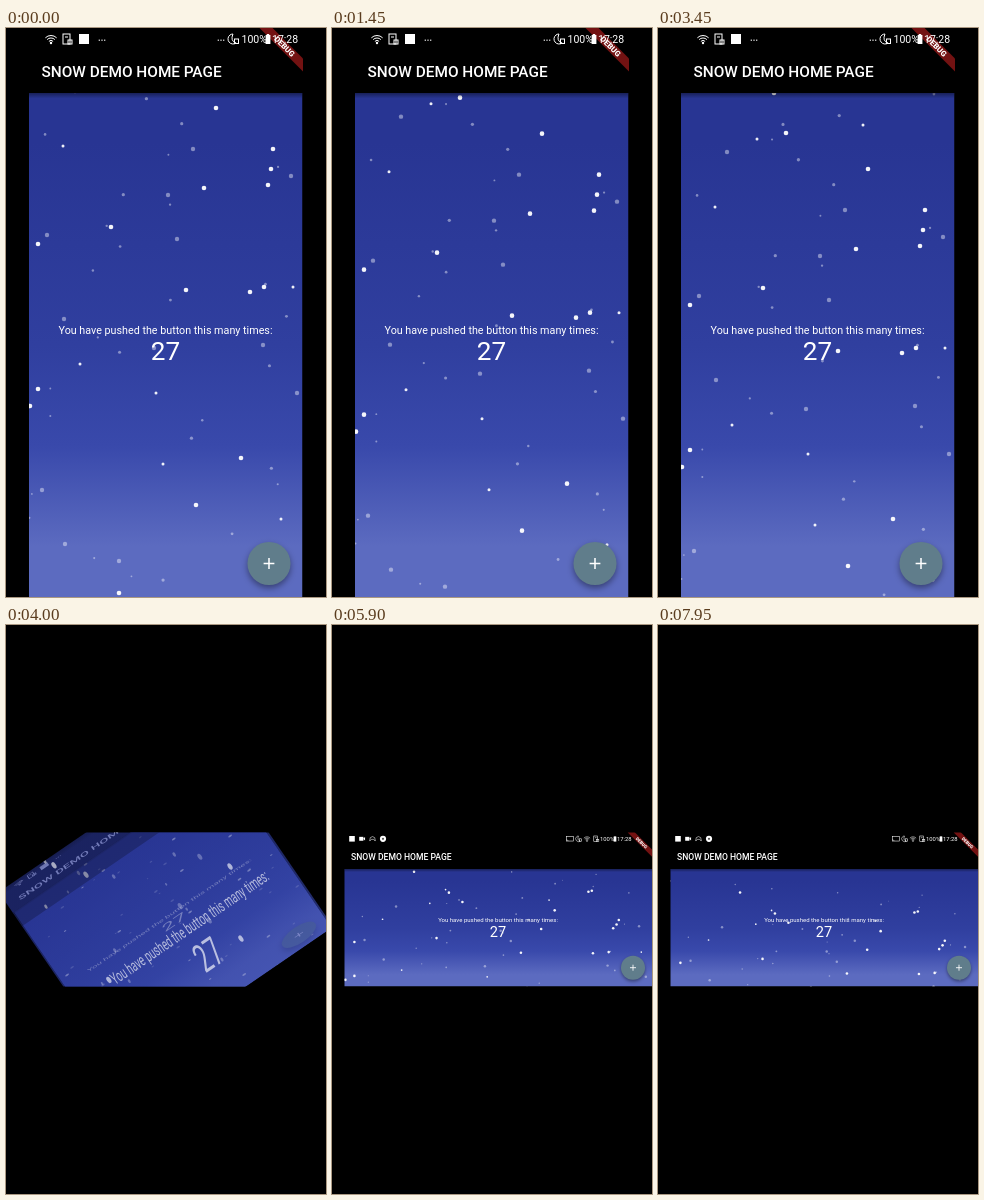
Animation, 320 px wide and 569 px high, one loop 8000 ms. Source, as an HTML page with a canvas:

```html
<!DOCTYPE html>
<html lang="en">
<head>
<meta charset="utf-8">
<title>Snow demo</title>
<style>
  html, body { margin: 0; width: 100%; height: 100%; overflow: hidden; background: #000; }
  canvas { display: block; width: 320px; height: 569px; }
</style>
</head>
<body>
<canvas id="stage"></canvas>
<script>
const canvas = document.getElementById('stage');
const c = canvas.getContext('2d');
const dpr = Math.max(1, window.devicePixelRatio || 1);
canvas.width = 320 * dpr;
canvas.height = 569 * dpr;

const LOOP = 8000, FREEZE = 3600, TURN = 4000;
const CX = 160, CY = 284.5;

// s is the size of one dp in stage pixels
const portrait = {
  s: 0.769, x: 23, y: 65, w: 273.5, h: 504, top: 0, right: 297,
  title: [35.5, 49.3], center: 159.5, label: 305.5, count: 332.3,
  fab: [263, 535.5], status: 11,
  icons: [[wifi, 45], [card, 61], [square, 78], [dots, 96], [dots, 215], [moon, 227], [battery, 262]],
  percent: 235.5, clock: 266
};
const landscape = {
  s: 0.43, x: 12.3, y: 244, w: 307.7, h: 117.5, top: 207.5, right: 320,
  title: [19, 235.2], center: 166, label: 296.7, count: 311.7,
  fab: [301, 342.7], status: 213.8,
  icons: [[square, 20], [camera, 30], [pad, 40.5], [ring, 51], [cast, 238], [moon, 246.5],
          [wifi, 255], [card, 264], [battery, 283]],
  percent: 268, clock: 285
};

// Main flakes as x, y pairs on the upright page at time 0
const large = [210,80, 267,121, 265,141, 262,157, 198,160, 105,199, 32,216, 258,259, 244,264, 180,262,
  32,361, 24,378, 235,430, 190,477, 113,565, 128,44, 116,4, 243,-4, 240,0, 85,-86];
const faint = [187,121, 285,148, 162,167, 41,207, 171,211, 58,291, 148,320, 257,317, 291,365, 36,462,
  113,533, 59,516, 69,63];
const small = [57,118, 287,259, 74,336, 150,365, 157,436, 275,491, 99,50, 205,36, 113,-9];

const flakes = [];
function addFlakes(spots, r, alpha) {
  for (let i = 0; i < spots.length; i += 2) flakes.push({ x: spots[i], y: spots[i + 1], r, alpha });
}
addFlakes(large, 2.3, 0.95);
addFlakes(faint, 2.2, 0.42);
addFlakes(small, 1.5, 0.92);

let seed = 7;
function random() {
  seed = (seed * 16807) % 2147483647;
  return seed / 2147483647;
}
// Minor flakes, spread evenly down the page
for (let y = -150; y < 560; y += 18) {
  flakes.push({ x: 23 + 274 * random(), y: y + 16 * random(), r: 0.8 + 0.9 * random(), alpha: 0.42 });
}

function disc(x, y, r) {
  c.beginPath();
  c.arc(x, y, r, 0, 7);
  c.fill();
}

function line(...points) {
  c.beginPath();
  for (let i = 0; i < points.length; i += 2) c.lineTo(points[i], points[i + 1]);
  c.stroke();
}

function text(str, x, y, size, weight = 400, align = 'left') {
  c.font = `${weight} ${size}px Roboto, sans-serif`;
  c.textAlign = align;
  c.fillText(str, x, y);
}

// Status icons, drawn around the origin
function wifi() {
  for (const r of [3, 5.5, 8]) {
    c.beginPath();
    c.arc(0, 4.5, r, -2.35, -0.79);
    c.stroke();
  }
  disc(0, 4, 1.2);
}
function card() {
  c.strokeRect(-4, -5, 7, 10);
  line(-2, -2, 1, -2);
  c.strokeRect(1, 1, 4, 4);
}
function square() { c.fillRect(-5, -5, 10, 10); }
function dots() { for (const x of [-2.7, 0, 2.7]) c.fillRect(x - 0.6, 0.6, 1.2, 1.2); }
function moon() {
  c.beginPath();
  c.arc(0, 0, 5, 0.9, 4.7);
  c.quadraticCurveTo(-3, 2, 3, 4);
  c.stroke();
  c.strokeRect(1.5, 0, 4, 4.5);
}
function battery() { c.fillRect(-2.4, -4, 4.8, 9); c.fillRect(-1.2, -5, 2.4, 1); }
function camera() {
  c.fillRect(-5, -3.5, 7.5, 7);
  c.beginPath();
  c.moveTo(2, 0); c.lineTo(5.5, -3); c.lineTo(5.5, 3);
  c.fill();
}
function pad() { line(-5, 4, -4, -2, 0, -4, 4, -2, 5, 4, 2, 1, -2, 1, -5, 4); }
function ring() {
  disc(0, 0, 5.5);
  c.fillStyle = '#555';
  disc(0, 0, 2);
  c.fillStyle = '#fff';
}
function cast() { c.strokeRect(-6, -4, 12, 8); line(-6, 1, -3, 4); }

function drawStatus(p) {
  c.fillStyle = c.strokeStyle = '#fff';
  for (const [icon, x] of p.icons) {
    c.save();
    c.translate(x, p.status);
    c.scale(p.s / 0.769, p.s / 0.769);
    c.lineWidth = 1;
    icon();
    c.restore();
  }
  const size = 13.7 * p.s;
  text('100%', p.percent, p.status + size * 0.36, size);
  text('17:28', p.clock, p.status + size * 0.36, size);
}

function drawBanner(p) {
  c.save();
  c.translate(p.right, p.top);
  c.beginPath();
  c.rect(-60, 0, 60, 60);
  c.clip();
  c.rotate(Math.PI / 4);
  c.scale(p.s, p.s);
  c.fillStyle = '#731212';
  c.fillRect(-40, 28, 80, 12);
  c.fillStyle = '#fff';
  text('DEBUG', 0, 37.6, 10.2, 900, 'center');
  c.restore();
}

function drawSnow(p, time) {
  const fall = 0.0351 * Math.min(time, 3650) / 1000 + 0.0863 * Math.max(0, time - 3650) / 1000;
  for (const { x, y, r, alpha } of flakes) {
    const across = (x - portrait.x) / portrait.w;
    const down = (y - portrait.y) / portrait.h + fall;
    c.fillStyle = `rgba(255,255,255,${alpha})`;
    if (down > -0.02 && down < 1.02) disc(p.x + across * p.w, p.y + down * p.h, r * p.s / 0.769);
  }
}

function drawFab(p) {
  const [x, y] = p.fab, arm = 7 * p.s;
  c.save();
  c.shadowColor = 'rgba(0,0,0,0.4)';
  c.shadowBlur = 8 * p.s * dpr;
  c.shadowOffsetY = 4 * p.s * dpr;
  c.fillStyle = '#607d8b';
  disc(x, y, 28 * p.s);
  c.restore();
  c.strokeStyle = '#fff';
  c.lineWidth = 2 * p.s;
  line(x - arm, y, x + arm, y);
  line(x, y - arm, x, y + arm);
}

function drawPage(p, time) {
  c.fillStyle = '#000';
  c.fillRect(p.x - 13, p.top, p.w + 14, p.y - p.top);

  c.save();
  c.beginPath();
  c.rect(p.x, p.y, p.w, p.h);
  c.clip();
  const sky = c.createLinearGradient(0, p.y, 0, p.y + p.h);
  sky.addColorStop(0.1, '#283593');
  sky.addColorStop(0.5, '#303f9f');
  sky.addColorStop(0.7, '#3949ab');
  sky.addColorStop(0.9, '#5c6bc0');
  c.fillStyle = sky;
  c.fillRect(p.x, p.y, p.w, p.h);
  drawSnow(p, time);
  const shade = c.createLinearGradient(0, p.y, 0, p.y + 7 * p.s);
  shade.addColorStop(0, 'rgba(0,0,0,0.4)');
  shade.addColorStop(1, 'rgba(0,0,0,0)');
  c.fillStyle = shade;
  c.fillRect(p.x, p.y, p.w, 7 * p.s);
  c.fillStyle = '#fff';
  text('You have pushed the button this many times:', p.center, p.label, 14 * p.s, 400, 'center');
  text('27', p.center, p.count, 34 * p.s, 400, 'center');
  drawFab(p);
  c.restore();

  drawBanner(p);
  c.fillStyle = '#fff';
  text('SNOW DEMO HOME PAGE', ...p.title, 20 * p.s, 500);
  drawStatus(p);
}

// The upright page turns and stretches while the wide page fades in over it
function drawTurn(time) {
  const q = time < TURN ? 0 : 1 - (1 - (time - 3930) / 400) ** 5;
  const w = 154 + 166 * q, h = 320 - 166 * q, zoom = 1 + 2.5 * (1 - q);
  c.save();
  c.beginPath();
  c.rect(0, 207.5, 320, 154);
  c.clip();
  c.translate(CX, CY);
  c.rotate((q - 1) * Math.PI / 2);
  c.beginPath();
  c.rect(-w / 2, -h / 2, w, h);
  c.clip();

  c.save();
  c.scale(w / 277, h / 569);
  c.translate(-CX, -CY);
  drawPage(portrait, FREEZE);
  c.restore();

  if (q > 0) {
    c.save();
    c.globalAlpha = Math.min(1, q * 1.06);
    c.scale(w / 320 * zoom, h / 154 * zoom);
    c.translate(-CX, -CY);
    drawPage(landscape, time);
    c.restore();
    c.fillStyle = `rgba(0,0,0,${0.6 * (1 - q)})`;
    c.fillRect(-w / 2, -0.386 * h, w, 0.076 * h);
  }
  c.restore();
}

function draw(time) {
  c.setTransform(dpr, 0, 0, dpr, 0, 0);
  c.fillStyle = '#000';
  c.fillRect(0, 0, 320, 569);
  if (time < FREEZE) drawPage(portrait, time);
  else if (time < 4330) drawTurn(time);
  else drawPage(landscape, time);
}

const start = performance.now();
function tick() {
  const time = (performance.now() - start) % LOOP;
  draw(Math.floor(time / 50) * 50);
  requestAnimationFrame(tick);
}
tick();
</script>
</body>
</html>
```
